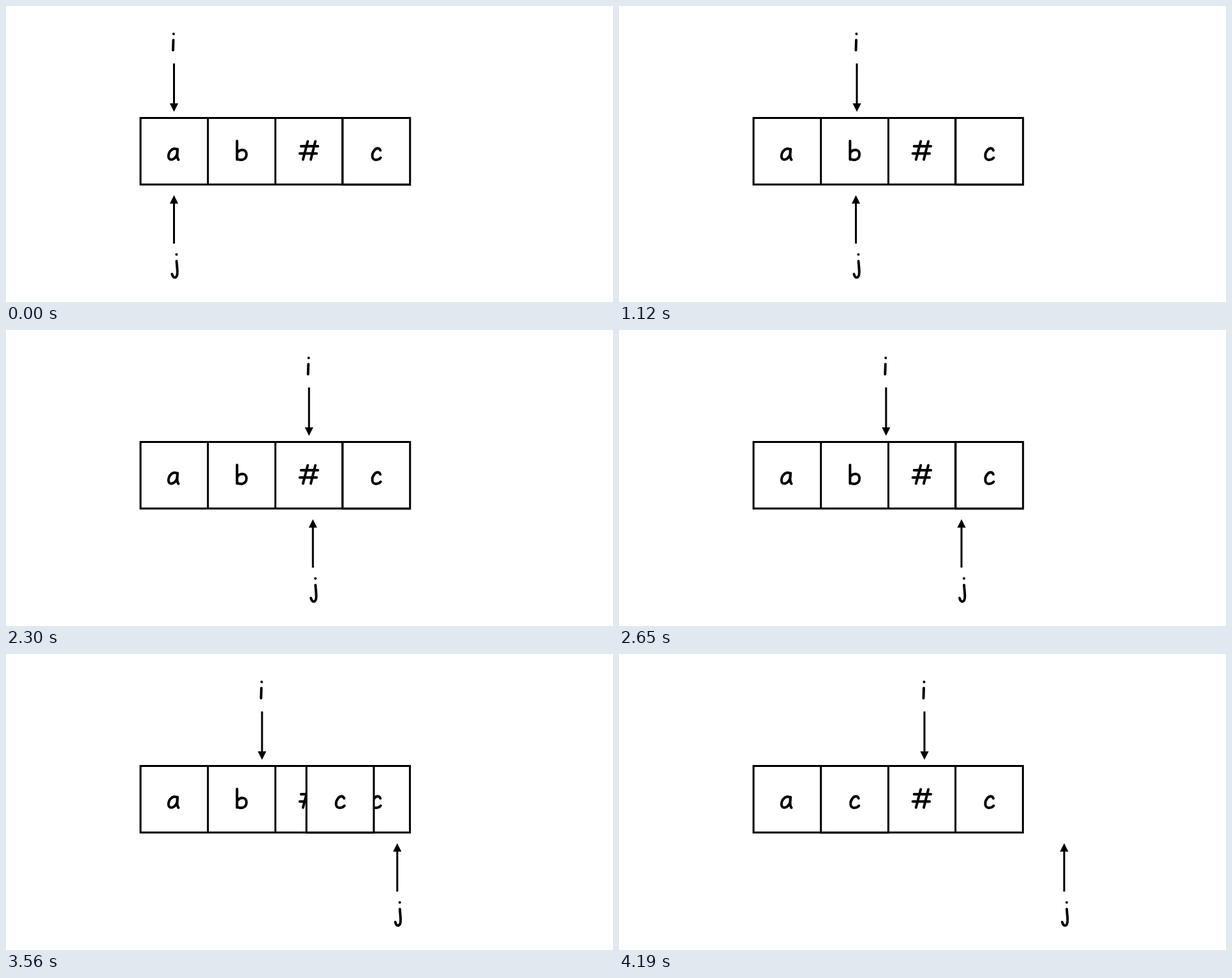
Write an HTML page that moves like this. It is 934 by 456 pixels and loops after 4850 ms.

```html
<!DOCTYPE html>
<html lang="en">
<head>
<meta charset="utf-8">
<title>Two pointers</title>
<style>
  html, body { margin: 0; width: 100%; height: 100%; overflow: hidden; background: #fff; }
  svg { display: block; width: 934px; height: 456px; }
  .line { fill: none; stroke: #000; stroke-width: 3; }
  .letter { fill: none; stroke: #000; stroke-width: 3.9; stroke-linecap: round; stroke-linejoin: round; }
</style>
</head>
<body>
<svg viewBox="0 0 934 456" role="img" aria-label="Array a b # c with pointers i and j">
  <defs>
    <!-- hand-lettered c, relative to the left border of its cell -->
    <path id="c" class="letter" d="M58 222.5C56.5 218 51.5 218.5 48.5 222.5C44 228.5 44.5 237 51.5 237C55 237 57 235.5 58.5 233.8"/>
  </defs>

  <path class="line" d="M207 172.5H621.5V275H207ZM310.7 172.5V275M414.5 172.5V275M517.7 172.5V275"/>
  <path class="letter" d="M263.5 221C257 217 250 224 250 231.5C250 239.5 260 238 263.5 228L264 220.5Q262 232 265.3 236.8"/>
  <path class="letter" d="M355.5 208V236.5M355.5 227C359 220 370 219.5 370 228.5C370 238 360 238.5 355.5 235"/>
  <path class="letter" d="M454 216H480M452 227.3H478M464.3 208.5L457 236.5M476 208.5L469 236.5"/>
  <use href="#c" x="518"/>

  <g id="card">
    <path d="M0 172.5H103.7V275H0Z" fill="#fff" stroke="#000" stroke-width="3"/>
    <use href="#c"/>
  </g>

  <g id="i">
    <path class="letter" d="M-.6 43h.1M-1 52.5L-1.5 68"/>
    <path class="line" d="M0 88.5V152"/>
    <path d="M-6.5 150H6.5L0 163Z"/>
  </g>
  <g id="j">
    <path class="letter" d="M3.8 382.8h.1M4 393C4.3 399 5.2 405 5.2 410C5.2 420 -1 421 -3 413"/>
    <path class="line" d="M0 302V366"/>
    <path d="M-6.5 304.5H6.5L0 291.5Z"/>
  </g>
</svg>
<script>
const LOOP = 4850, END = 4190, STEP = 70, MOVE = 830;
const starts = [96, 1165, 2199, 3272];
const stops = {
  i: [258.5, 366, 470, 366, 470],
  j: [258.5, 364.5, 468.5, 571.5, 685],
  card: [518, 518, 518, 518, 310.7],
};

// The picture advances in steps; the grid shifts once midway.
function stepTime(t) {
  const shift = t < 1900 ? 0 : 60;
  return Math.min(END, Math.floor((t - shift) / STEP) * STEP + shift);
}

function ease(t) {
  const u = Math.min(1, Math.max(0, t / MOVE));
  return (1 - Math.cos(Math.PI * u)) / 2;
}

function draw() {
  const t = stepTime(performance.now() % LOOP);
  for (const [id, xs] of Object.entries(stops)) {
    const x = starts.reduce((sum, s, k) => sum + (xs[k + 1] - xs[k]) * ease(t - s), xs[0]);
    document.getElementById(id).setAttribute("transform", `translate(${x.toFixed(2)} 0)`);
  }
  requestAnimationFrame(draw);
}
draw();
</script>
</body>
</html>
```
